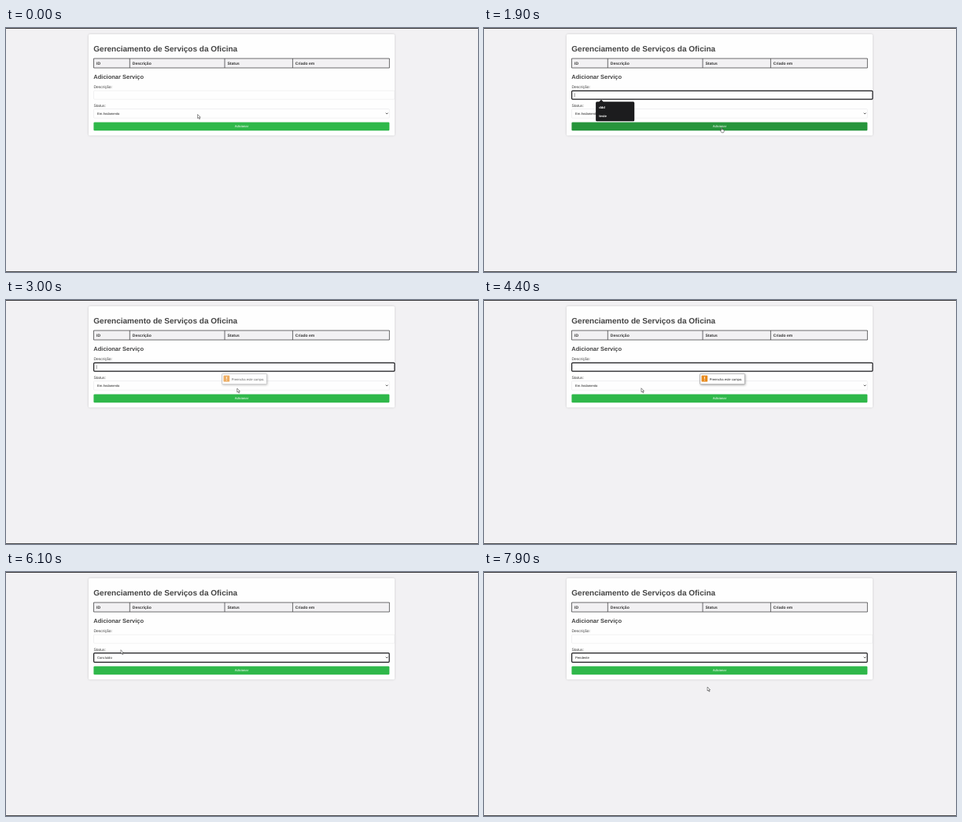
Animation of 600 by 312 pixels, one loop 8000 ms. Source, as an HTML page:

```html
<!DOCTYPE html>
<html lang="pt">
<head>
<meta charset="utf-8">
<style>
  html, body { margin: 0; width: 100%; height: 100%; overflow: hidden; background: #f2f1f3; }
  svg { display: block; width: 600px; height: 312px; }
  text { font: 4.17px "Liberation Sans", Arial, sans-serif; fill: #222; text-rendering: geometricPrecision; }
  .bold { font-weight: bold; }
  .ring { fill: none; stroke: #1b1b1e; stroke-width: 1.2; }
  .white { fill: #fff; }
</style>
</head>
<body>
<svg viewBox="0 0 600 312">
  <defs>
    <filter id="soft" x="-10%" y="-30%" width="120%" height="160%"><feGaussianBlur stdDeviation="1.5"/></filter>
    <filter id="wide" x="-10%" y="-100%" width="120%" height="300%"><feGaussianBlur stdDeviation="4"/></filter>
  </defs>
  <rect width="600" height="312" fill="#f2f1f3"/>
  <rect width="600" height="1" fill="#3a3a3c"/>
  <rect y="311" width="600" height="1" fill="#4a4a4c"/>
  <rect x="105" y="8" width="389" height="129.5" rx="1.5" opacity=".16" filter="url(#soft)"/>
  <rect x="105" y="8" width="389" height="129.5" rx="1.5" fill="#fefefe"/>

  <text class="bold" x="111.3" y="29.6" style="font-size:10px;fill:#444">Gerenciamento de Serviços da Oficina</text>
  <path d="M111.5 39H487.4V51H111.5ZM157.3 39V51M278 39V51M364.4 39V51" fill="#f2f1f3" stroke="#48484a" stroke-width=".8"/>
  <g id="heads"></g>
  <text class="bold" x="111.3" y="64.6" style="font-size:7.5px;fill:#444">Adicionar Serviço</text>
  <text x="111.4" y="77" style="font-size:5px;fill:#444">Descrição:</text>
  <text x="111.4" y="100.7" style="font-size:5px;fill:#444">Status:</text>

  <rect x="111.5" y="80.2" width="382.5" height="11" rx="1" fill="#fefefe" stroke="#e2e2e4" stroke-width=".5"/>
  <rect x="111.5" y="103.5" width="375.8" height="11.7" rx="1" fill="#fefefe" stroke="#e2e2e4" stroke-width=".5"/>
  <text id="value" x="116" y="111"></text>
  <path d="M482.9 108.6L484.2 110L485.5 108.6" fill="none" stroke="#222" stroke-width=".8"/>
  <rect id="button" x="111.4" y="120.5" width="376" height="10.8" rx="1.2"/>
  <text class="white" x="299.4" y="127.4" text-anchor="middle">Adicionar</text>

  <rect id="inputRing" class="ring" x="111.6" y="80.3" width="382.4" height="10.8" rx="1"/>
  <path id="caret" d="M115.2 83.3V88.3" stroke="#333" stroke-width=".5"/>
  <rect id="selectRing" class="ring" x="111.6" y="103.6" width="375.6" height="11.7" rx="1"/>

  <g id="suggest">
    <path d="M143.5 94.3H146.3L149 91.8L151.7 94.3H189.8Q191.2 94.3 191.2 95.8V117.8Q191.2 119.3 189.8 119.3H143.5Q142.1 119.3 142.1 117.8V95.8Q142.1 94.3 143.5 94.3Z" fill="#1c1c1e"/>
    <text class="bold white" x="146.2" y="102.7">ddd</text>
    <text class="bold white" x="146.2" y="114">teste</text>
  </g>

  <g id="tip">
    <rect x="275" y="95" width="57.5" height="14" rx="1" opacity=".3" filter="url(#soft)"/>
    <rect x="274.6" y="94.3" width="57" height="13.4" rx="1" fill="#fff" stroke="#8a8a8c" stroke-width=".6"/>
    <rect x="276.5" y="96.4" width="7.7" height="8" rx=".6" fill="#e88a1c"/>
    <path d="M280.35 98V101.3M280.35 102.2V103.2" stroke="#fff" stroke-width=".9"/>
    <text x="286.8" y="102.5">Preencha este campo.</text>
  </g>

  <g id="menu">
    <rect x="112" y="118" width="375" height="17" opacity=".35" filter="url(#wide)"/>
    <rect x="111.6" y="115.8" width="375.7" height="15.8" fill="#fff" stroke="#2a2a2c" stroke-width=".6"/>
    <rect id="mark" x="111.9" width="375.1" height="5.2" fill="#1b63c9"/>
    <g id="options"></g>
  </g>

  <g id="pointer">
    <path id="arrow" d="M0 0V5L1.2 4L2.1 6L3 5.6L2.1 3.7H3.6Z" fill="#fff" stroke="#222" stroke-width=".5"/>
    <path id="hand" d="M0 .5Q.6 -.2 1.1 .5V2.4L3.7 3V4.8L3 6.4H.6L-1.1 4V3.2L0 3.7Z" fill="#fff" stroke="#222" stroke-width=".5"/>
    <path id="beam" d="M-.8 0H.8M0 0V5M-.8 5H.8" fill="none" stroke="#222" stroke-width=".5"/>
  </g>
</svg>
<script>
const $ = id => document.getElementById(id);
const labels = ["Pendente", "Em Andamento", "Concluído"];
const rowTop = i => 115.9 + i * 5.15;

function addText(parent, x, y, label, style = "") {
  const el = document.createElementNS("http://www.w3.org/2000/svg", "text");
  el.setAttribute("x", x);
  el.setAttribute("y", y);
  el.style.cssText = style;
  el.textContent = label;
  parent.append(el);
  return el;
}

[["ID", 115], ["Descrição", 160.8], ["Status", 281.5], ["Criado em", 367.8]]
  .forEach(([label, x]) => addText($("heads"), x, 46.7, label, "font-size:5px;font-weight:bold;fill:#333"));
const rows = labels.map((label, i) => addText($("options"), 116, rowTop(i) + 4, label));

// Pointer path: time, x, y
const path = [
  [0, 243.6, 110.5], [500, 188, 84], [900, 188, 84], [1300, 238, 134], [1500, 266, 139], [1800, 301.8, 127.5],
  [2800, 299, 126], [3000, 293.8, 113], [3200, 298, 125], [3400, 302, 124], [3600, 301, 113],
  [4200, 201.2, 112.5], [4700, 198, 113], [4900, 194, 118], [5100, 187, 123.5], [5300, 183.2, 127.5],
  [5900, 183.2, 127.5], [6100, 146, 99.6], [6400, 152, 110], [6700, 152, 110], [7000, 159, 118.7],
  [7500, 159, 118.7], [7700, 216, 157], [7900, 284, 147]
];

function pointerAt(t) {
  const next = path.findIndex(p => p[0] > t);
  if (next < 0) return path.at(-1).slice(1);
  const a = path[next - 1], b = path[next], k = (t - a[0]) / (b[0] - a[0]);
  return [a[1] + (b[1] - a[1]) * k, a[2] + (b[2] - a[2]) * k];
}

// Latest value in a list of [start, value]
const latest = (list, t) => list.reduce((v, [start, value]) => t >= start ? value : v, list[0][1]);
const show = (id, on) => $(id).style.display = on ? "" : "none";

function draw(now) {
  const t = Math.floor(now % 8000 / 100) * 100;
  const within = (a, b) => t >= a && t < b;
  const focus = within(700, 2000) || within(2200, 2800) || within(2900, 4500);
  const open = within(4600, 5700) || within(6600, 7300);
  const hover = within(1200, 1400) || within(1700, 2900) || within(3200, 3500) || within(5700, 6000);
  const picked = latest([[0, 1], [5700, 2], [7300, 0]], t);
  const marked = latest([[0, 1], [4900, 0], [5100, 1], [5300, 2], [6900, 1], [7000, 0]], t);

  show("inputRing", focus);
  show("caret", focus && (t - latest([[700, 700], [2200, 2200], [2900, 2900]], t)) % 1000 < 500);
  show("suggest", within(800, 2000));
  show("selectRing", t >= 5700 && !open);
  show("menu", open);
  $("tip").style.opacity = within(2200, 2800) ? Math.min(1, (t - 2100) / 200)
    : within(2900, 4500) ? Math.min(1, .35 + (t - 2900) / 300) : 0;

  $("button").setAttribute("fill", hover ? "#27953c" : "#2fb84a");
  $("value").textContent = labels[picked];
  $("mark").setAttribute("y", rowTop(marked));
  rows.forEach((row, i) => row.style.fill = i === marked ? "#fff" : "#222");

  const [x, y] = pointerAt(t);
  const typing = !open && y > 80 && y < 91;
  $("pointer").setAttribute("transform", `translate(${x} ${y})`);
  show("hand", hover);
  show("beam", typing);
  show("arrow", !hover && !typing);
}

const start = performance.now();
function tick() {
  draw(performance.now() - start);
  requestAnimationFrame(tick);
}
tick();
</script>
</body>
</html>
```
